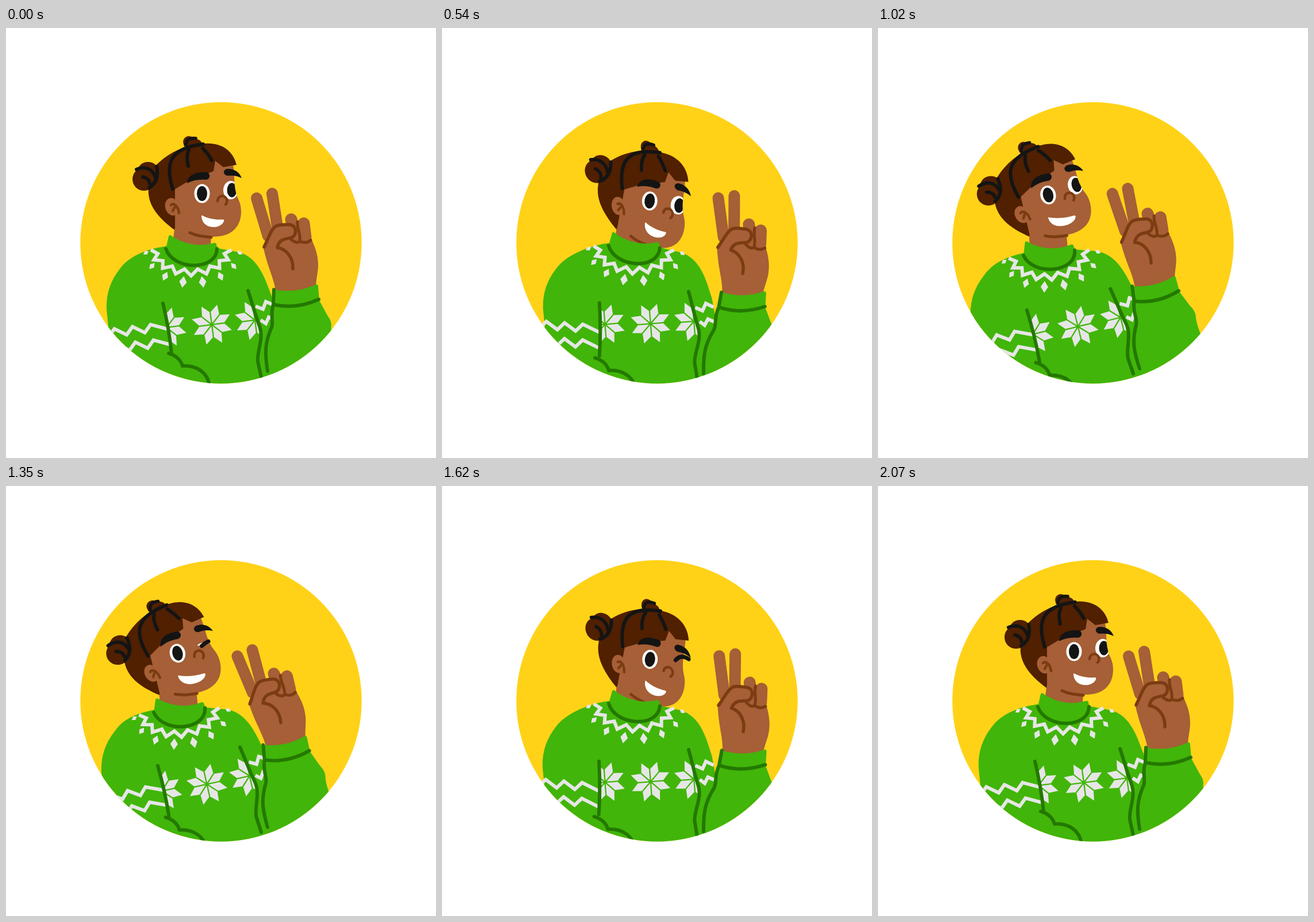
An HTML page with a canvas that plays this animation: 748x748 px, repeating every 2100 ms.

```html
<!DOCTYPE html>
<html lang="en">
<head>
<meta charset="utf-8">
<title>Peace sign</title>
<style>
html, body { margin: 0; width: 100%; height: 100%; overflow: hidden; background: #fff; }
canvas { display: block; width: 748px; height: 748px; }
</style>
</head>
<body>
<canvas id="c" width="748" height="748"></canvas>
<script>
const ctx = document.getElementById('c').getContext('2d');
const LOOP = 2100;
const YELLOW = '#ffd218', GREEN = '#41b509', DARK = '#247800', SKIN = '#a65f36',
  FOLD = '#7c3c12', HAIR = '#502000', BLACK = '#141414', KNIT = '#e6e6e6';

// Sway poses: lean (px), head tilt (deg), wrist shift (px), hand tilt (deg), shoulder shift (px)
const REST = [0, 0, 0, 0, 0], RIGHT = [12, 11, 20, 9.5, 0];
const keys = [
  [0, REST],
  [360, [7, 2.5, 6, 2.2, 5]],
  [570, RIGHT],
  [750, [4, 7, 12, 7, -5]],
  [1020, [-25, -13, -23, -2, -14]],
  [1350, [-21, -14, -18, -6, -9]],
  [1620, RIGHT],
  [1850, [-27, -14, -25, -3, -24]],
  [2070, REST],
  [LOOP, REST]
];

// Monotone cubic through the poses
function pose(t) {
  const n = keys.length - 1;
  let k = 0;
  while (k < n - 1 && t >= keys[k + 1][0]) k++;
  const h = keys[k + 1][0] - keys[k][0], u = (t - keys[k][0]) / h;
  return REST.map((_, j) => {
    const val = i => keys[i][1][j];
    const slope = i => { i = (i + n) % n; return (val(i + 1) - val(i)) / (keys[i + 1][0] - keys[i][0]); };
    const tan = i => {
      const a = slope(i - 1), b = slope(i % n);
      return a * b <= 0 ? 0 : 2 * a * b / (a + b);
    };
    const a = val(k), d = val(k + 1) - a, m = tan(k) * h, q = tan(k + 1) * h;
    return a + u * (m + u * (3 * d - 2 * m - q + u * (m + q - 2 * d)));
  });
}

const ramp = (t, a, b) => Math.max(0, Math.min(1, (t - a) / (b - a)));
const move = (x, y) => new DOMMatrix().translate(x, y);
const turn = (deg, x, y) => move(x, y).rotate(deg).translate(-x, -y);
const grow = (sx, sy, x, y) => move(x, y).scale(sx, sy).translate(-x, -y);
// Shifts x with height above y0 and y with distance from x0
const bend = (kx, ky, x0, y0) => new DOMMatrix([1, ky, -kx, 1, kx * y0, -ky * x0]);
const at = (m, x, y) => { const p = m.transformPoint({ x, y }); return p.x + ' ' + p.y; };

function fill(color, d) { ctx.fillStyle = color; ctx.fill(new Path2D(d)); }
function line(color, w, d) {
  ctx.strokeStyle = color; ctx.lineWidth = w;
  ctx.stroke(new Path2D(d));
}
function oval(color, x, y, rx, ry, a = 0) {
  ctx.fillStyle = color;
  ctx.beginPath(); ctx.ellipse(x, y, rx, ry, a, 0, 7); ctx.fill();
}
function group(m, draw, clip) {
  ctx.save();
  if (clip) ctx.clip(new Path2D(clip));
  ctx.transform(m.a, m.b, m.c, m.d, m.e, m.f);
  draw();
  ctx.restore();
}
const STILL = move(0, 0);

function knit(points) {
  ctx.save();
  ctx.lineJoin = 'miter'; ctx.lineCap = 'butt';
  line(KNIT, 6, 'M' + points.join('L'));
  ctx.restore();
}
function flower(x, y) {
  for (let i = 0; i < 8; i++)
    group(move(x, y).rotate(15 + 45 * i), () => fill(KNIT, 'M3 0L21 -7.5L36 0L21 7.5Z'));
}

function yoke() {
  const zig = [];
  for (let i = 0; i <= 16; i++) {
    const a = Math.PI * i / 16, r = i % 2 ? 0 : 11;
    zig.push([322 - (59 + r) * Math.cos(a), 386 + (34 + r) * Math.sin(a)]);
  }
  knit(zig);
  for (const side of [-1, 1]) {
    for (let k = 0; k < 4; k++) {
      const deg = side * (12 + 24 * k), a = deg * Math.PI / 180, s = 1 - 0.15 * k;
      group(move(325 + 82 * Math.sin(a), 385 + 58 * Math.cos(a)).rotate(-deg * 0.7).scale(s),
        () => fill(KNIT, 'M0 -10L6.5 0L0 10L-6.5 0Z'));
    }
  }
  flower(358, 516);
}

function sleeveBands() {
  for (const row of [0, 1]) {
    const zig = [];
    for (let i = 0; i < 4; i++) {
      const x = 147 + 31.5 * i + 5 * row, y = 541 - 3.7 * i + 27 * row;
      zig.push([x, y], [x + 10, y - 14]);
    }
    knit([...zig, [293 + 5 * row, 527 + 27 * row]]);
  }
}

function backHair() {
  fill(HAIR, 'M258 242C280 218 310 203 345 201L340 280L300 300L294 352C262 328 245 306 248 276Z');
  oval(HAIR, 240, 263, 20, 20);
  oval(HAIR, 247, 247, 17, 14);
  line(BLACK, 6, 'M227 246C240 240 255 244 260 260M238 259C246 261 250 266 250 271M262 241C266 260 260 271 249 278');
}
function frontHair() {
  oval(HAIR, 325, 202, 16, 10);
  oval(HAIR, 318, 198, 10, 10);
  line(BLACK, 5.5, 'M313 203C314 193 321 191 330 192');
  fill(HAIR, 'M288 284C276 235 292 203 346 201C374 199 395 213 401 238L378 242L364 231L361 249L318 266Z');
  line(BLACK, 6, 'M290 280C276 235 285 209 343 202M317 240C314 228 314 220 318 212M342 209C349 216 354 223 358 230');
}

const FACE = 'M294 280L364 229L395 237C398 256 396 270 400 286C402 297 409 302 409 319C409 349 389 363 362 363C335 363 310 358 294 345Z';
function face(wink, smile) {
  fill(SKIN, FACE);
  oval(SKIN, 289, 311, 12, 15.5, -0.3);
  line(FOLD, 4.5, 'M287 308C293 303 300 312 301 322M294 311L290 318');
  line(FOLD, 5, 'M320 356C332 362 345 363 357 364');
  oval('#fff', 341, 288, 13.5, 16.5);
  oval(BLACK, 341, 288, 9, 13);
  group(STILL, () => group(grow(1, 1 - wink, 0, 283), () => {
    oval('#fff', 391, 282, 13, 16);
    oval(BLACK, 393, 282, 8.5, 12.5);
  }), FACE);
  if (wink > 0.7) {
    const u = ramp(wink, 0.86, 1);
    line(BLACK, 7, `M385 ${286 - 9 * u}Q392 ${282 - 18 * u} ${398 + 9 * u} ${281 - 12 * u}`);
  }
  line(FOLD, 4.5, 'M368 301C369 290 381 290 384 298C385 302 384 305 382 307');
  group(grow(1 + 0.2 * smile, 1, 379, 335), () =>
    fill('#fff', 'M341 326C352 332 366 334 377 333Q380 333 379 336C375 350 342 352 340 328Q340 325 341 326Z'));
}
function brows(wink) {
  fill(BLACK, 'M315 270C316 255 330 250 348 251C357 252 356 264 347 264C335 263 325 265 315 270Z');
  group(move(0, 5 * wink), () =>
    fill(BLACK, 'M410 261C406 250 396 244 384 245C377 247 377 255 385 257C395 256 402 257 410 261Z'));
}

function collar() {
  fill(GREEN, 'M278 384L283 362Q285 358 290 363C312 377 338 381 361 374Q366 373 366 377L368 384C362 424 286 422 278 384Z');
  line(DARK, 6, 'M278 384C291 422 366 423 367 384');
}
function hand() {
  line(SKIN, 20, 'M436 296L456 362M463 288L473 352');
  line(SKIN, 21, 'M496 333L502 356M518 340L521 364');
  fill(SKIN, 'M447 378L470 343L510 340L529 362C536 378 543 392 543 412C543 430 537 440 540 466L470 470C470 440 455 420 447 378Z');
  line(FOLD, 5.5, 'M449 381C457 365 461 350 469 345C476 341 488 342 494 342C507 344 506 362 496 365C486 367 475 367 472 382C488 384 500 400 499 419');
  line(FOLD, 5, 'M507 337C506 350 513 358 511 371M496 368Q506 376 511 371Q522 376 530 369');
}
function sleeve() {
  fill(GREEN, 'M466 481L544 472L558 498C564 507 566 511 566 518C565 526 566 536 569 550L600 690L455 690L455 597C447 550 466 525 466 481Z');
}
function cuff() {
  fill(GREEN, 'M466 455Q505 462 537 447Q543 444 543 450L545 473Q505 490 466 481Z');
  line(DARK, 6, 'M466 455L465 481Q505 490 544 472M465 481C459 500 466 510 462 521C450 548 450 565 455 597');
}

function draw(t) {
  const [lean, tilt, swing, wave, shoulder] = pose(t);
  const wink = ramp(t, 1260, 1365) * (1 - ramp(t, 1760, 1860));
  const smile = ramp(-tilt, 0, 13);
  const right = Math.max(0, tilt), drop = 1.7 * Math.max(0, tilt - 2);
  const lift = -0.85 * shoulder, elbow = 0.5 * shoulder - drop;

  const body = bend(lean / 224, 0.0042 * lean, 390, 607);
  const arm = bend(0.0073 * swing, 0.0051 * swing, 417, 597);
  const palm = move(swing, 0.45 * swing).multiply(turn(wave, 505, 449));
  const head = move(lean - 0.6 * right, 0.35 * Math.abs(tilt))
    .multiply(turn(tilt, 322, 375)).multiply(bend(0, 0.008 * right, 290, 0));
  const b = (x, y) => at(body, x, y);
  const s = (x, y) => `${x + shoulder} ${y + lift}`;

  ctx.setTransform(1, 0, 0, 1, 0, 0);
  ctx.fillStyle = '#fff';
  ctx.fillRect(0, 0, 748, 748);
  ctx.lineCap = ctx.lineJoin = 'round';
  oval(YELLOW, 374, 373.7, 244.7, 244.7);
  ctx.save();
  ctx.beginPath(); ctx.arc(374, 373.7, 244.7, 0, 7); ctx.clip();

  group(head, backHair);
  fill(GREEN, `M${b(283, 379)}C${b(250, 383)} ${s(215, 395)} ${s(198, 419)}C${s(180, 442)} ${s(174, 465)} ${s(175, 490)}L${s(178, 520)}L120 680L480 680L${b(470, 500)}L${b(462, 466)}C${b(450, 435)} ${b(438, 392)} ${b(394, 388)}L${b(368, 383)}Z`);
  fill(SKIN, `M${at(head, 293, 350)}L${b(288, 390)}L${b(355, 395)}L${at(head, 357, 360)}L${at(head, 310, 325)}Z`);
  group(head, () => { face(wink, smile); frontHair(); brows(wink); });
  group(body, () => { yoke(); collar(); });

  // The left seam splits the chest flower from the sleeve bands
  const ax = 273 + shoulder, ay = 479 + lift, ex = 288 + elbow, ey = 566 + lift - 0.35 * elbow;
  const seam = `M${ax} ${ay}Q${(ax + ex) / 2 + 3} ${(ay + ey) / 2} ${ex} ${ey}`;
  group(STILL, () => group(body, () => flower(279, 521)), seam + `L500 ${ey}L500 ${ay}Z`);
  group(STILL, () => group(
    move(shoulder - 0.5 * drop, lift).multiply(turn(0.35 * tilt + 0.5 * drop, 251, 515)), sleeveBands),
    seam + `L100 ${ey + 40}L100 ${ay}Z`);
  line(DARK, 6, seam);
  group(move(1.2 * elbow, lift - 0.6 * elbow), () =>
    line(DARK, 6, 'M283 566C298 570 305 580 307 588C332 586 351 600 354 622'));

  const chest = 'M421 457C428 478 434 500 440 516C450 540 436 560 438 580L444 607';
  group(body, () => {
    group(STILL, () => flower(433, 508), chest + 'L350 607L350 457Z');
    knit([[434, 484], [447, 489], [452, 476], [466, 482]]);
    knit([[443, 508], [452, 514], [457, 503], [468, 507]]);
  });
  group(arm, sleeve);
  group(body, () => line(DARK, 6, chest));
  group(palm, hand);
  group(arm, cuff);
  ctx.restore();
}

const start = performance.now();
function frame() {
  const t = (performance.now() - start) % LOOP;
  draw(Math.floor(t / 30) * 30);
  requestAnimationFrame(frame);
}
frame();
</script>
</body>
</html>
```
